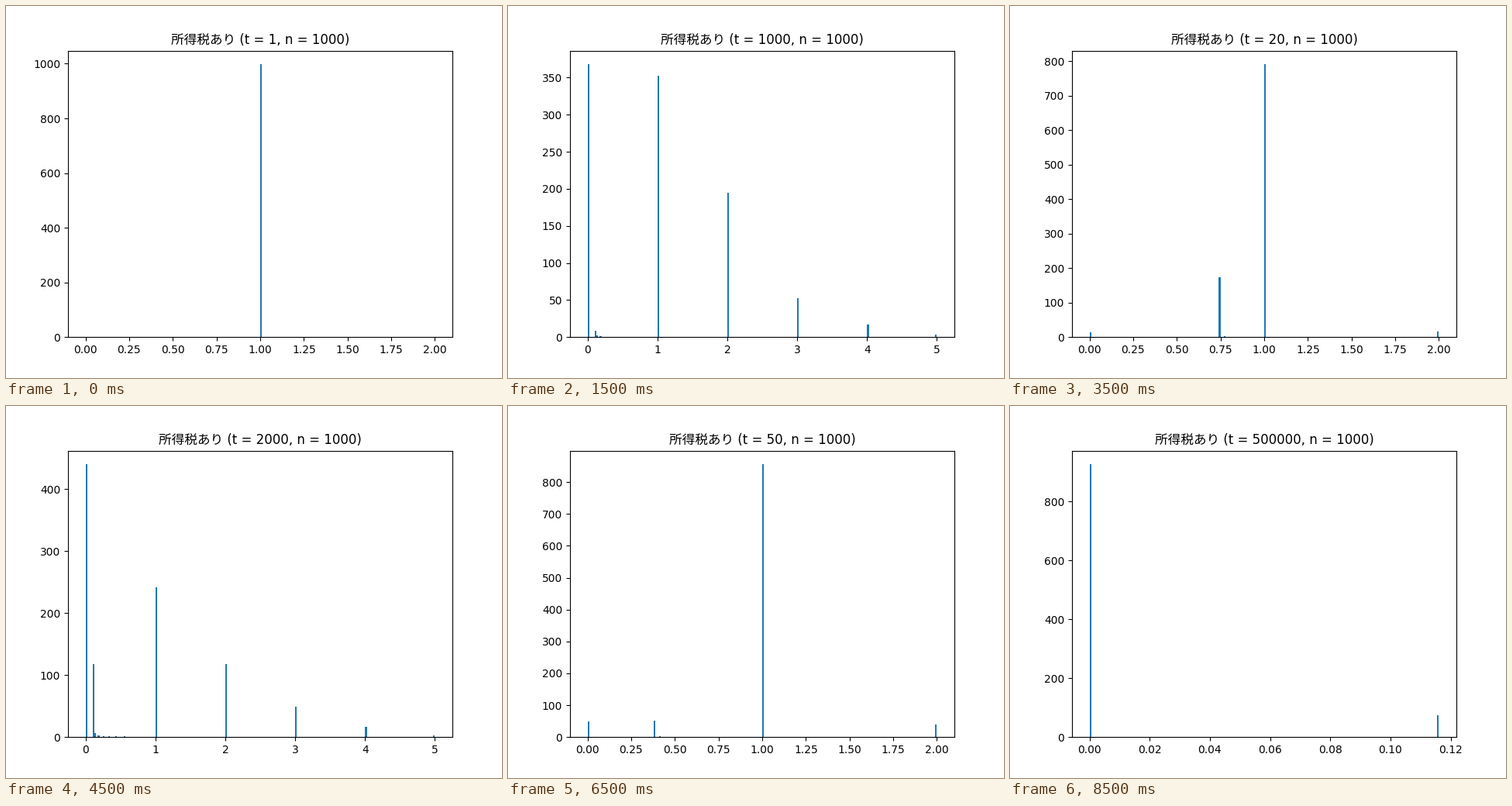
These frames come from a looping animation (640 by 480 pixels, 9000 ms). A matplotlib script:

```python
import matplotlib.pyplot as plt
import numpy as np
from matplotlib.animation import FuncAnimation

plt.rcParams["font.family"] = ["DejaVu Sans", "Noto Sans CJK JP"]

N = 1000
BINS = 200
FLOOR = 0.1161  # wealth at which the taxed group settles
NONE = 0.01     # stands for nobody on a log scale

# Steps are ordered by leading digit, then by power of ten.
STEPS = [lead * 10 ** power for lead in (1, 2, 5) for power in range(6)]

# Key points: step, people owning 1, people owning 2, taxed people
KEYS = np.log([
    (1, 998, 1, NONE),
    (10, 980, 10, NONE),
    (20, 791, 17, 173),
    (50, 856, 39, 52),
    (1000, 353, 195, 9),
    (2000, 242, 118, 118),
    (5000, 144, 45, 234),
    (20000, 48, 1, 245),
    (100000, 6, 1, 140),
    (500000, NONE, NONE, 73),
])


def trend(t):
    """Interpolate the key points on log-log axes."""
    return [np.exp(np.interp(np.log(t), KEYS[:, 0], col))
            for col in KEYS[:, 1:].T]


def distribution(t):
    """Return wealth levels and the number of people at each."""
    ones, twos, taxed = trend(t)
    level = max(FLOOR, 0.985 - 0.012 * t)
    people = {1: round(ones), 2: round(twos), level: round(taxed)}

    # The rich thin out quickly above 2.
    threes = twos * min(0.42, 0.267 * (t / N) ** 1.15)
    for k in range(4):
        people[3 + k] = int(threes * 3 ** -k ** 1.35)

    # A few taxed people trail above the main group.
    strays = round(0.055 * np.sqrt(twos * taxed))
    for k in range(1, strays + 1):
        people[level + 0.025 * k ** 1.6] = strays // k

    people[0] = N - sum(people.values())
    people = {x: n for x, n in people.items() if n > 0}
    return list(people), list(people.values())


fig, ax = plt.subplots(figsize=(6.4, 4.8), dpi=100)


def draw(i):
    t = STEPS[i]
    levels, counts = distribution(t)
    ax.clear()
    ax.hist(levels, bins=BINS, weights=counts, color="#1f77b4")
    ax.set_title(f"所得税あり (t = {t}, n = {N})", fontsize=12)
    return ax.patches


anim = FuncAnimation(fig, draw, frames=len(STEPS), interval=500,
                     init_func=lambda: draw(0), repeat=True, repeat_delay=0,
                     blit=False)
plt.show()
```
